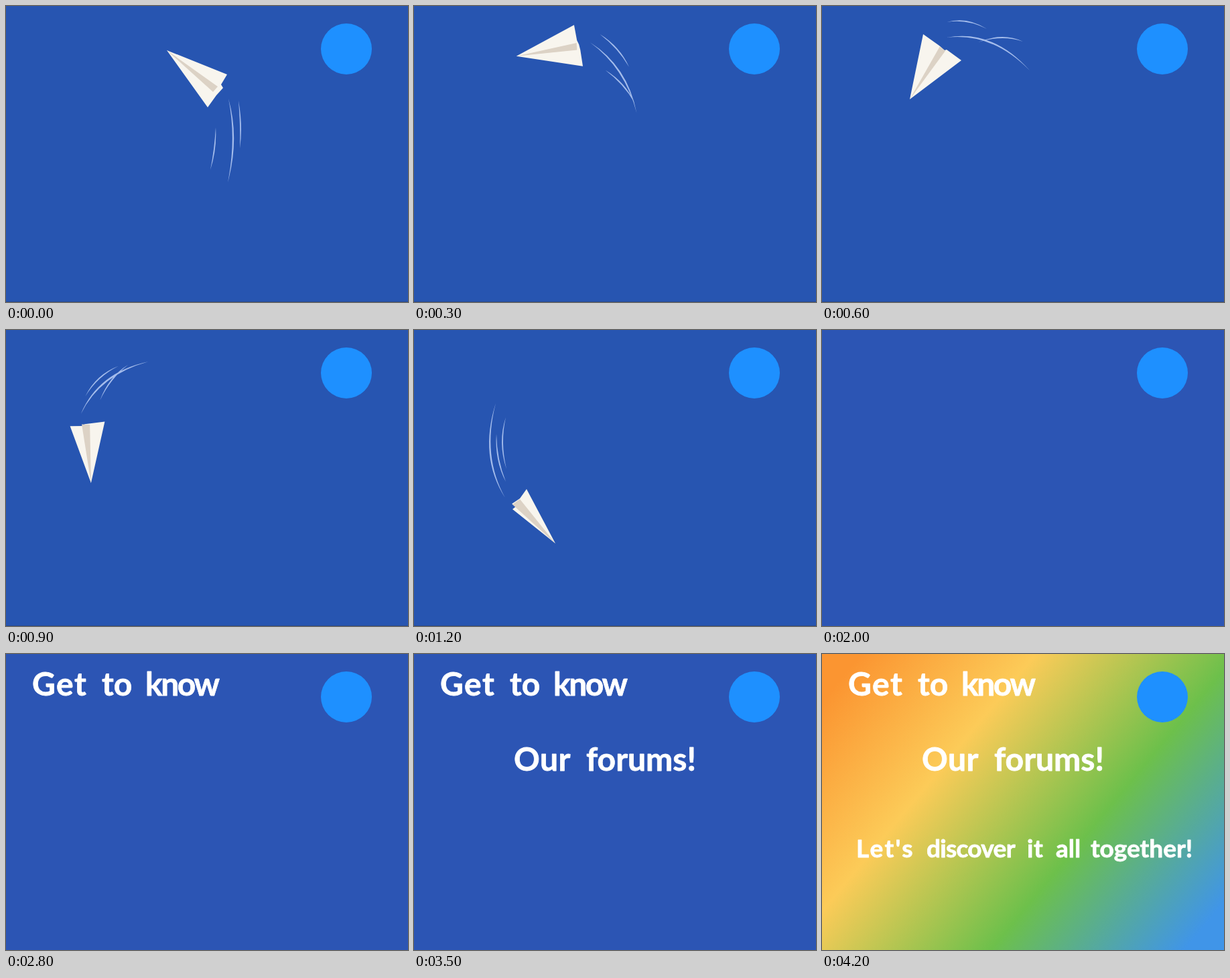
Animation of 600x441 px, one loop 5.5 s. Source, as an HTML page:

```html
<!DOCTYPE html>
<html lang="en">
<head>
<meta charset="utf-8">
<title>Get to know our forums</title>
<style>
  html, body { margin: 0; width: 100%; height: 100%; overflow: hidden; background: #2755b1; }
  svg { display: block; width: 100vw; height: 100vh; }
  text {
    font-family: Lato, "Open Sans", sans-serif; font-weight: 700; font-size: 48px;
    fill: #fff; stroke: #fff; stroke-width: .8; stroke-linejoin: round;
  }
  .small text { font-size: 37px; }
  .calm, .one, .two, .three { opacity: 0; animation: 5500ms step-end infinite; }
  .calm { animation-name: calm; }
  .one { animation-name: one; }
  .two { animation-name: two; }
  .three { animation-name: three; }
  @keyframes calm { 0% { opacity: 0 } 36.3636% { opacity: 1 } }
  @keyframes one { 0% { opacity: 0 } 50.9091% { opacity: 1 } }
  @keyframes two { 0% { opacity: 0 } 63.6364% { opacity: 1 } }
  @keyframes three { 0% { opacity: 0 } 76.3636% { opacity: 1 } }
</style>
</head>
<body>
<svg viewBox="0 0 600 441" preserveAspectRatio="none">
  <defs>
    <linearGradient id="rainbow" gradientUnits="userSpaceOnUse" x1="15" y1="-17" x2="585" y2="458">
      <stop offset=".06" stop-color="#fb9531"/>
      <stop offset=".33" stop-color="#fccb58"/>
      <stop offset=".64" stop-color="#6dc04b"/>
      <stop offset=".94" stop-color="#4095e8"/>
    </linearGradient>
  </defs>
  <rect width="600" height="441" fill="#2755b1"/>
  <rect y="440" width="600" height="1" fill="#274a92"/>
  <path id="streaks" fill="#c3d6fb" fill-opacity=".8"/>
  <path id="wings" fill="#f8f5ee"/>
  <path id="fold" fill="#dcd2c5"/>
  <rect class="calm" width="600" height="441" fill="#2c55b4"/>
  <rect class="three" width="600" height="441" fill="url(#rainbow)"/>
  <circle cx="508" cy="64" r="38" fill="#1e90ff"/>
  <g class="one">
    <text x="39" y="62" letter-spacing="1.5">Get</text>
    <text x="143" y="62">to</text>
    <text x="208" y="62" letter-spacing="-2.5">know</text>
  </g>
  <g class="two">
    <text x="149" y="174" letter-spacing=".5">Our</text>
    <text x="257" y="174">forums!</text>
  </g>
  <g class="three small">
    <text x="51" y="303" letter-spacing="2.3">Let's</text>
    <text x="156" y="303" letter-spacing="-.7">discover</text>
    <text x="306" y="303" letter-spacing=".5">it</text>
    <text x="349" y="303">all</text>
    <text x="401" y="303">together!</text>
  </g>
</svg>
<script>
const LOOP = 5500, STEP = 100;

// Each pose: time, tail position, heading, speed in px/s.
// plane: nose, wing, three tail points, wing, two fold points.
// trails: three streaks of head, middle and end.
const poses = [
  { t: 0, x: 318, y: 126, deg: -142, v: 300,
    plane: [240,66, 330,102, 321,117, 324,122, 314,133, 301,151, 316,120, 309,128],
    trails: [332,138, 339,199, 331,263, 347,141, 350,178, 349,212, 313,181, 311,213, 305,244] },
  { t: 600, x: 180, y: 64, deg: -237.5, v: 350,
    plane: [131,139, 151,42, 175,59, 183,66, 186,65, 208,81, 176,60, 184,67],
    trails: [186,47, 251,54, 310,96, 186,24, 216,23, 246,34, 233,54, 268,47, 300,53] },
  { t: 1200, x: 154, y: 256, deg: -309, v: 700,
    plane: [211,318, 147,267, 152,263, 146,259, 158,251, 168,237, 147,260, 158,252],
    trails: [136,250, 114,184, 122,109, 138,207, 132,168, 137,130, 137,226, 126,192, 123,155] },
  { t: 1600, x: 625, y: 330, deg: -392, v: 1600,
    trails: [606,344, 540,377, 464,399, 585,323, 545,346, 500,364, 606,347, 562,369, 513,386] },
  { t: 1800, x: 880, y: 170, deg: -392, v: 1600 }
];

const rad = d => d * Math.PI / 180;
const mix = (a, b, k) => a + (b - a) * k;
const mixAll = (a, b, k) => a.map((v, i) => mix(v, b[i], k));
const pairs = a => a.flatMap((v, i) => i % 2 ? [] : [[v, a[i + 1]]]);
const spin = ([x, y], d) => {
  const c = Math.cos(rad(d)), s = Math.sin(rad(d));
  return [x * c - y * s, x * s + y * c];
};

// Store shapes relative to the tail and heading.
poses.forEach((p, i) => {
  for (const part of ["plane", "trails"])
    p[part] = p[part]
      ? pairs(p[part]).flatMap(([x, y]) => spin([x - p.x, y - p.y], -p.deg))
      : poses[i - 1][part];
});

function hermite(a, va, b, vb, k) {
  const k2 = k * k, k3 = k2 * k;
  return (2 * k3 - 3 * k2 + 1) * a + (k3 - 2 * k2 + k) * va
       + (3 * k2 - 2 * k3) * b + (k3 - k2) * vb;
}

function poseAt(t) {
  let i = 0;
  while (i < poses.length - 2 && t >= poses[i + 1].t) i++;
  const a = poses[i], b = poses[i + 1], span = b.t - a.t;
  const k = Math.min(1, (t - a.t) / span);
  const va = spin([a.v * span / 1000, 0], a.deg);
  const vb = spin([b.v * span / 1000, 0], b.deg);
  const x = hermite(a.x, va[0], b.x, vb[0], k);
  const y = hermite(a.y, va[1], b.y, vb[1], k);
  const deg = mix(a.deg, b.deg, k);
  const place = part => pairs(mixAll(a[part], b[part], k)).map(p => {
    const [u, w] = spin(p, deg);
    return [x + u, y + w];
  });
  return { plane: place("plane"), trails: place("trails") };
}

const outline = pts => "M" + pts.map(p => p.map(n => n.toFixed(2))).join("L") + "Z";

// A thin curve through three points, tapering at both ends.
function streak([a, m, b], width) {
  const len = Math.hypot(b[0] - a[0], b[1] - a[1]);
  const nx = (a[1] - b[1]) / len * width, ny = (b[0] - a[0]) / len * width;
  const cx = 2 * m[0] - (a[0] + b[0]) / 2, cy = 2 * m[1] - (a[1] + b[1]) / 2;
  return `M${a}Q${cx + nx} ${cy + ny} ${b}Q${cx - nx} ${cy - ny} ${a}Z`;
}

const draw = (id, d) => document.getElementById(id).setAttribute("d", d);

let start, last;
function tick(now) {
  start ??= now;
  const t = Math.floor((now - start) % LOOP / STEP) * STEP;
  if (t !== last) {
    last = t;
    const { plane, trails } = poseAt(t);
    const gone = t >= 1800;
    draw("wings", gone ? "" : outline(plane.slice(0, 6)));
    draw("fold", gone ? "" : outline([plane[0], plane[6], plane[7]]));
    draw("streaks", gone ? "" : [0, 3, 6].map(i => streak(trails.slice(i, i + 3), i ? 1.9 : 2.4)).join(""));
  }
  requestAnimationFrame(tick);
}
requestAnimationFrame(tick);
</script>
</body>
</html>
```
